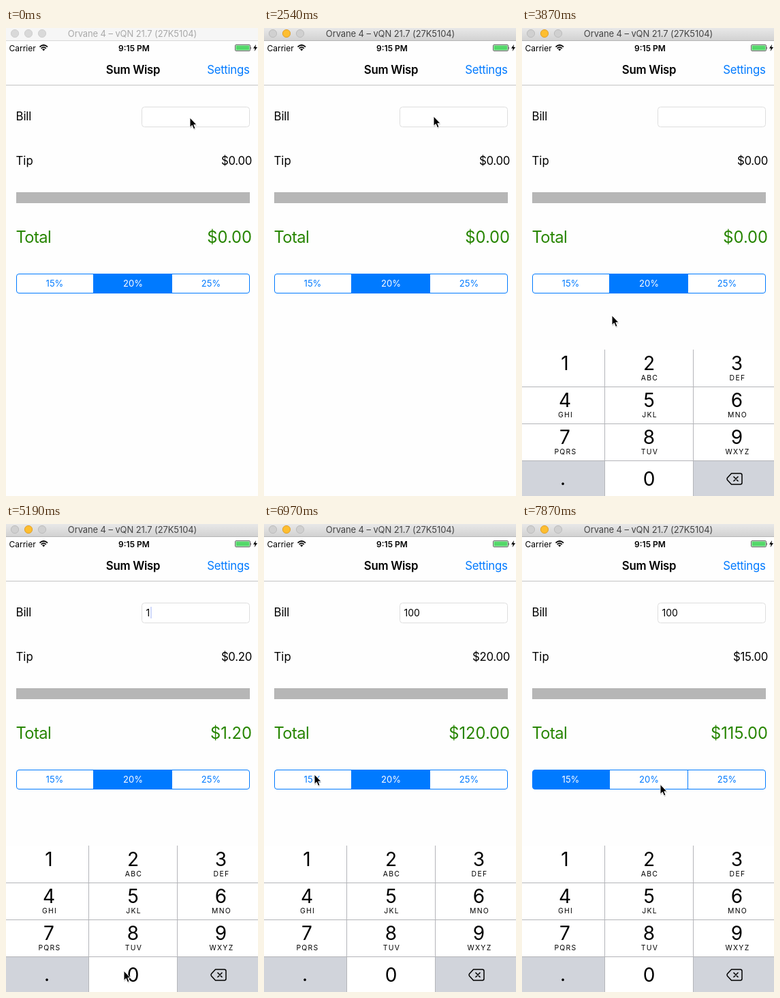
Recreate the animation shown at these times as an HTML page. Size 370 px wide and 684 px high, loop 8 s.

```html
<!DOCTYPE html>
<html lang="en">
<head>
<meta charset="utf-8">
<title>Bill splitter</title>
<style>
html, body { margin: 0; width: 100%; height: 100%; overflow: hidden; background: #fefefe; }
svg { display: block; font: 16.8px Inter, Roboto, sans-serif; }
.mid { text-anchor: middle; }
.end { text-anchor: end; }
.blue { fill: #007aff; }
.total { font-size: 23.7px; fill: #278500; }
.seg { font-size: 13px; }
.digit { font-size: 28px; }
.sub { font-size: 10.4px; letter-spacing: 1.3px; }
</style>
</head>
<body>
<svg width="370" height="684" viewBox="0 0 370 684">
  <defs>
    <linearGradient id="active" x2="0" y2="1"><stop stop-color="#e8e8e8"/><stop offset="1" stop-color="#d2d2d2"/></linearGradient>
  </defs>
  <rect width="370" height="684" fill="#fefefe"/>

  <rect id="bar" width="370" height="18"/>
  <path id="barLine" d="M0 18.5H370"/>
  <g id="dots"><circle cx="13" cy="8" r="5.6"/><circle id="amber" cx="33" cy="8" r="5.6"/><circle cx="53" cy="8" r="5.6"/></g>
  <text id="caption" class="mid" x="185.5" y="13" font-size="13" letter-spacing="-.1">Orvane 4 – vQN 21.7 (27K5104)</text>

  <text x="4.5" y="33.5" font-size="12">Carrier</text>
  <g fill="none" stroke="#000" stroke-width="1.7">
    <path d="M49.5 27.6Q55.2 22.4 61 27.6M51.6 29.8Q55.2 26.6 58.8 29.8"/>
    <path d="M53 31L55.2 33.4 57.4 31Q55.2 29.6 53 31Z" fill="#000" stroke="none"/>
  </g>
  <text class="mid" x="188" y="33.5" font-size="12" font-weight="600">9:15 PM</text>
  <rect x="336.5" y="24.5" width="22" height="9" rx="1.5" fill="#fff" stroke="#555" stroke-width=".9"/>
  <rect x="337.5" y="25.5" width="20" height="7" fill="#53d769"/>
  <path d="M359.5 27.5v3.5q1.5-1.7 0-3.5M367 24l-4 5.8h2.6l-.9 4.2 4.3-6h-2.7z"/>

  <text class="mid" x="186.5" y="67" font-weight="600" letter-spacing="-.3">Sum Wisp</text>
  <text class="end blue" x="357.5" y="67" letter-spacing="-.3">Settings</text>
  <path d="M0 83.5H370" stroke="#c4c4c4"/>

  <text x="14.5" y="134.5" letter-spacing="-.1">Bill</text>
  <rect x="199.5" y="115.5" width="158" height="29" rx="4" fill="#fff" stroke="#dedede"/>
  <text id="bill" x="205.5" y="135" font-size="14"></text>
  <rect id="caret" y="121" width="2" height="17" fill="#4268ee"/>
  <text x="14.5" y="199.5">Tip</text>
  <text id="tip" class="end" x="361" y="199.5" letter-spacing="-.3"></text>
  <rect x="15" y="240" width="343" height="16" fill="#b6b6b6"/>
  <text class="total" x="14.5" y="314" letter-spacing="-.6">Total</text>
  <text id="total" class="total end" x="361" y="314"></text>

  <rect x="15.5" y="359.5" width="342" height="28" rx="3.5" fill="#fff"/>
  <path id="chosen" class="blue"/>
  <path d="M128.5 359.5v28M243.5 359.5v28" stroke="#007aff"/>
  <rect x="15.5" y="359.5" width="342" height="28" rx="3.5" fill="none" stroke="#007aff"/>
  <g id="rates"></g>

  <g id="pad">
    <rect y="470" width="370" height="214" fill="#fff"/>
    <path d="M0 632H121V684H0ZM251 632H370V684H251Z" fill="#d1d4db"/>
    <rect id="press" x="122" y="633" width="129" height="51" fill="#d1d4db"/>
    <path d="M0 524.5H370M0 578.5H370M0 632.5H370M121.5 470V684M251.5 470V684" stroke="#b4b5b9"/>
    <g id="keys"></g>
    <path d="M307.5 651H320.5Q323 651 323 653.5V664.5Q323 667 320.5 667H307.5L301.5 660.5Q300.5 659 301.5 657.5ZM310.5 655.5L317.5 662.5M317.5 655.5L310.5 662.5" fill="none" stroke="#000" stroke-width="1.5" stroke-linejoin="round"/>
  </g>

  <g id="cursor">
    <path d="M.5 1.5V16L3.8 13 6 18 8.5 17 6.3 12H10.5Z" fill="#000" opacity=".2"/>
    <path d="M0 0V14.3L3.3 11.3 5.5 16.7 8 15.6 5.8 10.4H10Z" stroke="#fff"/>
  </g>
</svg>
<script>
const $ = id => document.getElementById(id);
const label = (cls, x, y, s) => `<text class="mid ${cls}" x="${x}" y="${y}">${s}</text>`;
const columns = [63, 186.5, 315.5];
const letters = ['', 'ABC', 'DEF', 'GHI', 'JKL', 'MNO', 'PQRS', 'TUV', 'WXYZ'];
$('keys').innerHTML = letters.map((s, i) => {
  const x = columns[i % 3], y = 500 + 54 * Math.floor(i / 3);
  return label('digit', x, y, i + 1) + label('sub', x + 1, y + 15, s);
}).join('') + label('digit', 60, 668, '.') + label('digit', 186.5, 669, 0);

// The screen refreshes in steps; every state below is keyed by step number.
const LOOP = 8000, STEP = 148.2;
const path = [
  [0, 270, 131], [2, 270, 135], [9, 270, 135], [10, 267, 160], [11, 262, 175], [13, 249, 129],
  [22, 249, 129], [23, 244, 150], [24, 215, 235], [26, 132, 420], [28, 77, 490], [29, 76, 493],
  [32, 76, 493], [33, 82, 510], [35, 173, 653], [36, 174, 658], [43, 174, 658], [44, 170, 640],
  [45, 150, 560], [47, 74, 366], [48, 71, 367], [51, 71, 367], [53, 203, 380.5]
];
const slide = [150, 45, 8];
const carets = [[22, 25], [28, 35], [38, 45], [48, 52]];

function cursorAt(n) {
  const i = path.findIndex(p => p[0] >= n);
  if (i < 1) return path[0].slice(1);
  const [a, ax, ay] = path[i - 1], [b, bx, by] = path[i], k = (n - a) / (b - a);
  return [ax + (bx - ax) * k, ay + (by - ay) * k];
}

function caretAt(n) {
  if (carets.some(([a, b]) => n >= a && n < b)) return 1;
  return carets.some(c => c[1] === n) ? .25 : 0;
}

function draw(n) {
  const focused = n >= 17;
  $('bar').setAttribute('fill', focused ? 'url(#active)' : '#f6f6f6');
  $('barLine').setAttribute('stroke', focused ? '#b5b5b5' : '#d8d8d8');
  $('dots').setAttribute('fill', focused ? '#d0d0d0' : '#d9d9d9');
  $('dots').setAttribute('stroke', focused ? '#bcbcbc' : '#cfcfcf');
  $('amber').setAttribute('fill', focused ? '#fdbe30' : '#d9d9d9');
  $('amber').setAttribute('stroke', focused ? '#e0a02c' : '#cfcfcf');
  $('caption').setAttribute('fill', focused ? '#444' : '#a9a9a9');

  const bill = n < 30 ? '' : n < 38 ? '1' : n < 41 ? '10' : '100';
  const low = n >= 50, tip = bill * (low ? .15 : .2);
  $('bill').textContent = bill;
  $('tip').textContent = '$' + tip.toFixed(2);
  $('total').textContent = '$' + (+bill + tip).toFixed(2);
  $('caret').setAttribute('x', [206, 212, 221, 230][bill.length]);
  $('caret').setAttribute('opacity', caretAt(n));

  $('chosen').setAttribute('d', low ? 'M129 359.5H19Q15.5 359.5 15.5 363V384Q15.5 387.5 19 387.5H129Z' : 'M128 359.5H244V387.5H128Z');
  $('rates').innerHTML = [15, 20, 25].map((r, i) =>
    label(r === (low ? 15 : 20) ? 'seg" fill="#fff' : 'seg blue', [71.5, 186.5, 301][i], 378, r + '%')).join('');

  const drop = n < 21 ? 214 : slide[n - 21] || 0;
  $('pad').setAttribute('transform', `translate(0 ${drop})`);
  $('press').setAttribute('opacity', n === 40 ? 1 : 0);
  $('cursor').setAttribute('transform', `translate(${cursorAt(n)})`);
}

let shown = -1;
const start = performance.now();
function tick() {
  const t = (performance.now() - start) % LOOP;
  const n = Math.min(53, Math.floor((t + 3) / STEP));
  if (n !== shown) draw(shown = n);
  requestAnimationFrame(tick);
}
tick();
</script>
</body>
</html>
```
